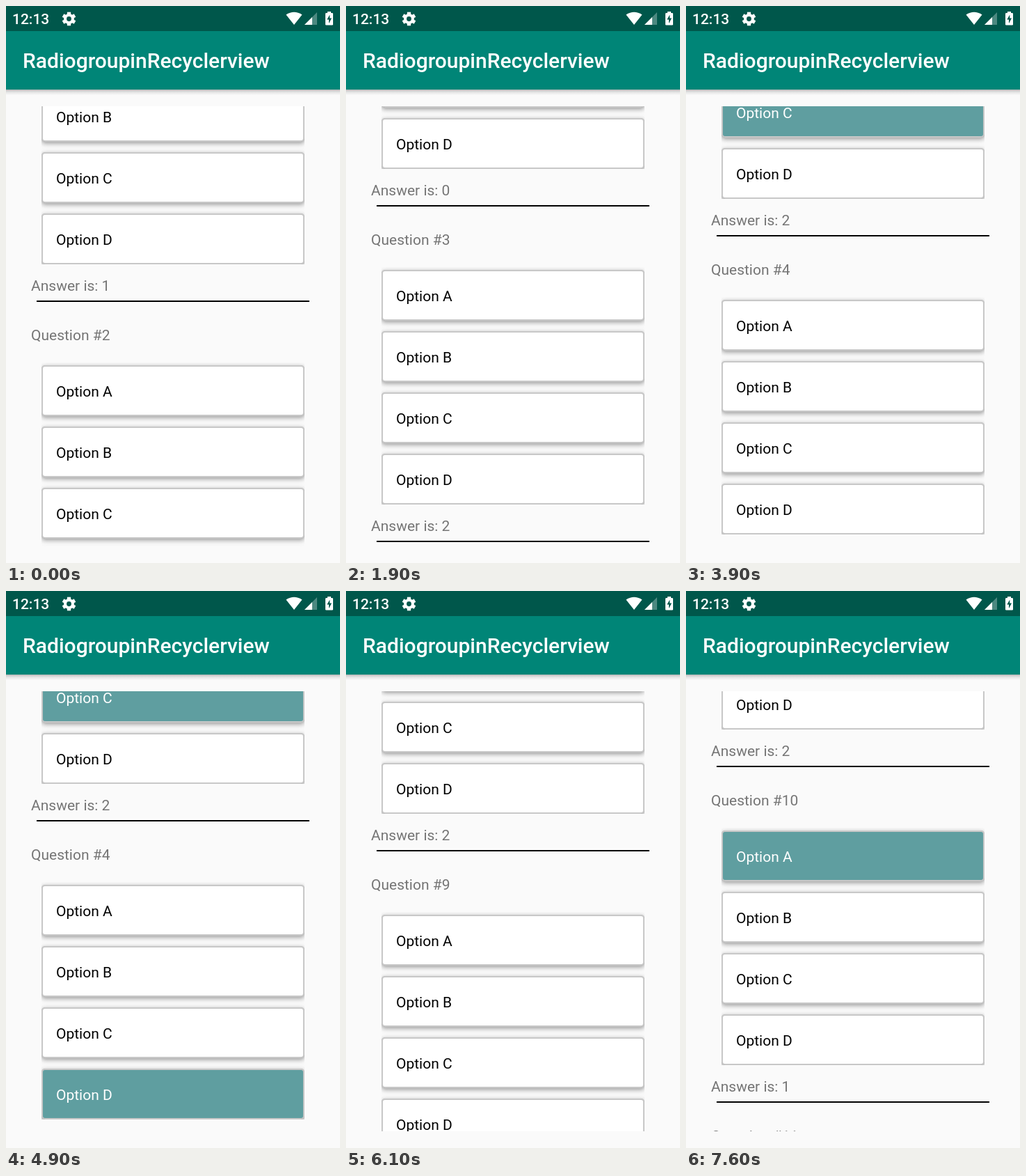
These frames come from a looping animation (480x800 px, 8 s). An HTML page with a canvas:

```html
<!DOCTYPE html>
<html lang="en">
<head>
<meta charset="utf-8">
<title>Radio group list</title>
<style>
  html, body { margin: 0; width: 100%; height: 100%; overflow: hidden; background: #fafafa; }
  canvas { display: block; width: 480px; height: 800px; }
</style>
</head>
<body>
<canvas id="stage"></canvas>
<script>
const LOOP = 8000, STEP = 100;
const PITCH = 482, LIST_TOP = 144, LIST_BOTTOM = 776;
const BOX = { x: 51, w: 378, h: 73, first: 43, pitch: 88 };
const ANSWERS = [1, 0, 2, 2, 1];
const FONT = 'Roboto, "Open Sans", sans-serif';

// question, option, time of the tap, fade length
const TAPS = [
  { q: 2, o: 1, at: 1000, fade: 0 },
  { q: 3, o: 2, at: 3100, fade: 1 },
  { q: 4, o: 3, at: 4800, fade: 2 },
  { q: 10, o: 0, at: 7600, fade: 0 }
];

const canvas = document.getElementById('stage');
const dpr = window.devicePixelRatio || 1;
canvas.width = 480 * dpr;
canvas.height = 800 * dpr;
const ctx = canvas.getContext('2d');

const lerp = (a, b, p) => a + (b - a) * p;
const slow = p => 1 - (1 - p) ** 2;
const swipe = p => 1 - (1 - p ** 1.4) ** 2.2;

const MOVES = [
  { t0: 0, t1: 500, from: 9, to: 232, ease: slow },
  { t0: 1300, t1: 1900, from: 232, to: 628, ease: swipe },
  { t0: 3400, t1: 3900, from: 628, to: 1067, ease: swipe },
  { t0: 5200, t1: 5400, from: 1067, to: 1866, ease: p => p ** 1.6 }
];

function scrollAt(t) {
  if (t >= 5400) {
    const left = Math.max(0, 7000 - t) / 1400;
    return Math.round(4037 - 1613 * left ** 2.227);
  }
  let y = 9;
  for (const m of MOVES) {
    if (t < m.t0) break;
    y = lerp(m.from, m.to, m.ease(Math.min(1, (t - m.t0) / (m.t1 - m.t0))));
  }
  return Math.round(y);
}

function checkedAt(t, q, o) {
  const tap = TAPS.find(s => s.q === q && s.o === o);
  if (!tap || t < tap.at) return 0;
  return tap.fade > 1 ? Math.min(1, ((t - tap.at) / STEP + 1) / tap.fade) : 1;
}

const mix = (a, b, p) => `rgb(${a.map((v, i) => Math.round(lerp(v, b[i], p))).join(',')})`;

function text(str, x, y, color, size = 21, weight = 400) {
  ctx.font = `${weight} ${size}px ${FONT}`;
  ctx.fillStyle = color;
  ctx.fillText(str, x, y);
}

function rect(x, y, w, h, color) {
  ctx.fillStyle = color;
  ctx.fillRect(x, y, w, h);
}

function shape(points, color) {
  ctx.beginPath();
  points.forEach(([x, y]) => ctx.lineTo(x, y));
  ctx.closePath();
  ctx.fillStyle = color;
  ctx.fill();
}

function roundPath(x, y, w, h, r) {
  ctx.beginPath();
  ctx.roundRect(x, y, w, h, r);
}

function shadow(blur, dy, alpha) {
  ctx.shadowColor = `rgba(0,0,0,${alpha})`;
  ctx.shadowBlur = blur * dpr;
  ctx.shadowOffsetY = dy * dpr;
  ctx.fill();
}

function option(y, letter, on) {
  const { x, w, h } = BOX;
  ctx.save();
  roundPath(x, y, w, h, 5);
  ctx.fillStyle = '#c8c8c8';
  shadow(5, 0, 0.1);
  shadow(6, 3, 0.3);
  ctx.restore();
  roundPath(x + 2, y + 2, w - 4, h - 4, 3);
  ctx.fillStyle = mix([255, 255, 255], [95, 158, 160], on);
  ctx.fill();
  text('Option ' + letter, 72, y + 45, mix([0, 0, 0], [255, 255, 255], on));
}

function question(n, y, t) {
  text('Question #' + n, 36, y + 7, '#757575');
  const top = y + BOX.first;
  ctx.save();
  ctx.beginPath();
  ctx.rect(BOX.x, top - 4, BOX.w, 4 + 3 * BOX.pitch + BOX.h);
  ctx.clip();
  [...'ABCD'].forEach((c, i) => option(top + i * BOX.pitch, c, checkedAt(t, n, i)));
  ctx.restore();
  text('Answer is: ' + ANSWERS[(n - 1) % ANSWERS.length], 36, y + 418, '#757575');
  rect(44, y + 432, 392, 2, '#000');
}

function list(t) {
  const offset = scrollAt(t);
  ctx.save();
  ctx.beginPath();
  ctx.rect(36, LIST_TOP, 408, LIST_BOTTOM - LIST_TOP);
  ctx.clip();
  const first = Math.max(1, Math.floor(offset / PITCH));
  for (let n = first; n < first + 4; n++) question(n, PITCH * (n - 1) - offset, t);
  ctx.restore();
}

function gear(cx, cy) {
  ctx.save();
  ctx.translate(cx, cy);
  ctx.fillStyle = '#fff';
  for (let i = 0; i < 6; i++) {
    ctx.fillRect(-2.6, -9.8, 5.2, 5);
    ctx.rotate(Math.PI / 3);
  }
  ctx.beginPath();
  ctx.arc(0, 0, 7.4, 0, 7);
  ctx.fill();
  ctx.beginPath();
  ctx.arc(0, 0, 3.4, 0, 7);
  ctx.fillStyle = '#00574b';
  ctx.fill();
  ctx.restore();
}

function statusBar() {
  rect(0, 0, 480, 36, '#00574b');
  text('12:13', 9, 26, '#fff', 21, 500);
  gear(90.5, 18.5);

  ctx.beginPath();
  ctx.moveTo(414, 27);
  ctx.lineTo(402.5, 12.5);
  ctx.quadraticCurveTo(414, 5, 425.5, 12.5);
  ctx.closePath();
  ctx.fillStyle = '#fff';
  ctx.fill();

  shape([[429, 27], [447, 9], [447, 27]], 'rgba(255,255,255,.3)');
  shape([[429, 27], [440, 16], [440, 27]], '#fff');

  rect(462, 8, 5, 3, '#fff');
  roundPath(459, 10, 11, 17.5, 1.2);
  ctx.fillStyle = '#fff';
  ctx.fill();
  shape([[465.3, 12.5], [461.3, 19.6], [464, 19.6], [464, 25], [468, 17.6], [465.3, 17.6]], '#00574b');
}

function appBar() {
  const g = ctx.createLinearGradient(0, 120, 0, 128);
  g.addColorStop(0, 'rgba(0,0,0,.27)');
  g.addColorStop(0.4, 'rgba(0,0,0,.1)');
  g.addColorStop(1, 'rgba(0,0,0,0)');
  rect(0, 120, 480, 8, g);
  rect(0, 36, 480, 84, '#008577');
  text('RadiogroupinRecyclerview', 24, 89, '#fff', 30, 500);
}

function draw(now) {
  const t = Math.floor((now % LOOP) / STEP) * STEP;
  ctx.setTransform(dpr, 0, 0, dpr, 0, 0);
  rect(0, 0, 480, 800, '#fafafa');
  list(t);
  appBar();
  statusBar();
}

const start = performance.now();
function tick() {
  draw(performance.now() - start);
  requestAnimationFrame(tick);
}
tick();
</script>
</body>
</html>
```
